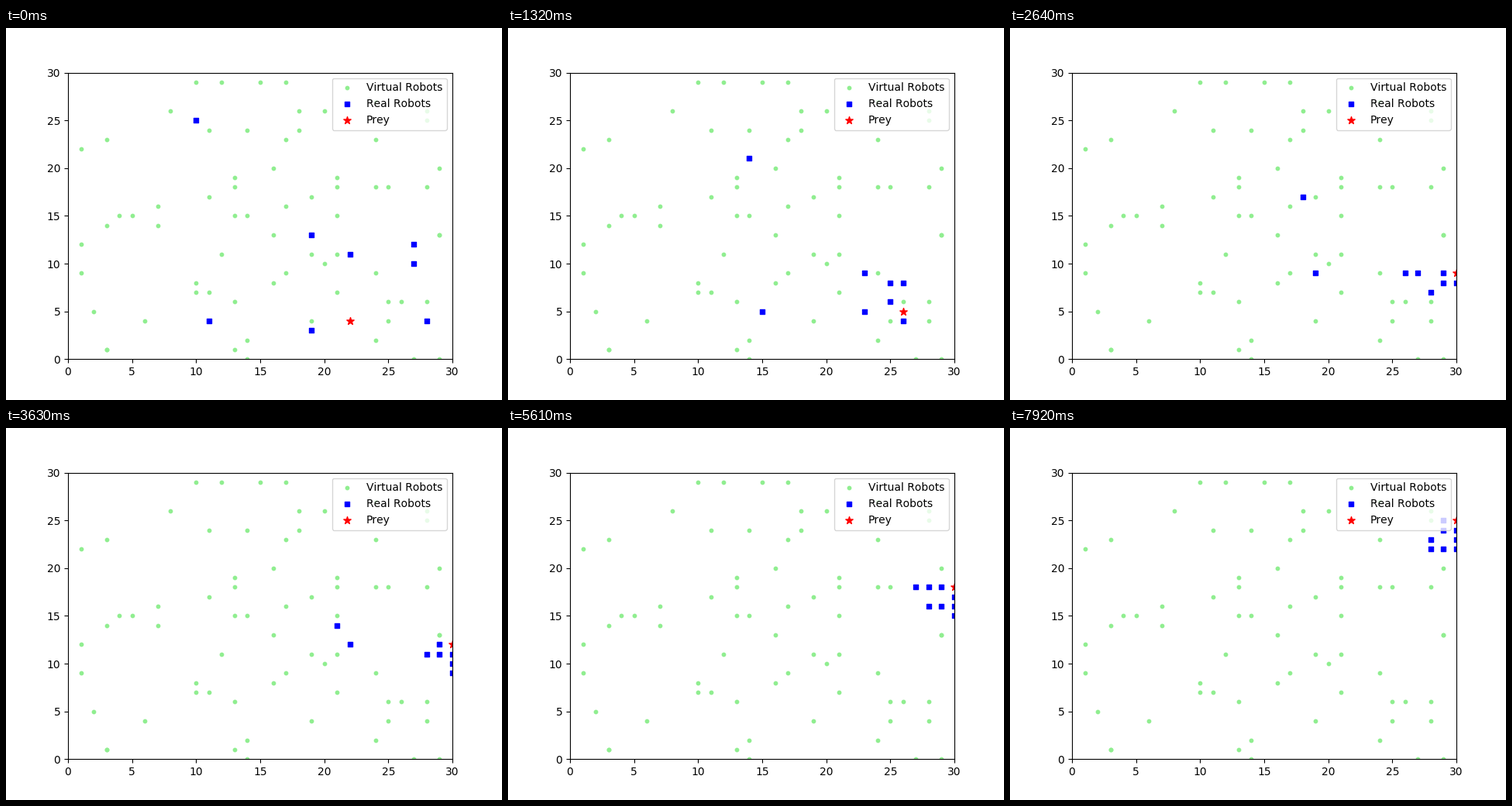
Recreate the animation shown at these times as a matplotlib script. Size 640 by 480 pixels, loop 8000 ms.

```python
import numpy as np
import matplotlib.pyplot as plt
from matplotlib.animation import FuncAnimation

SIZE = 30
LOOP_MS = 8000
STEP_MS = 330
TICK_MS = 20
STEPS = 24
DOTS = 70

# Each hunter: start cell, place it wants beside the prey,
# steps it trails behind, and the distance at which it holds still
HUNTERS = [
    dict(start=(22, 11), slot=(0, -1), lag=0, gap=0),
    dict(start=(27, 10), slot=(0, 0), lag=1, gap=0),
    dict(start=(28, 4), slot=(0, 0), lag=2, gap=2),
    dict(start=(27, 12), slot=(-1, 0), lag=0, gap=0),
    dict(start=(19, 3), slot=(-1, 0), lag=0, gap=3),
    dict(start=(11, 4), slot=(-1, 0), lag=0, gap=0),
    dict(start=(10, 25), slot=(-2, 0), lag=0, gap=4),
    dict(start=(19, 13), slot=(-2, 0), lag=0, gap=4),
]


def prey_at(step):
    """The prey runs right, then turns diagonally and climbs the right edge."""
    step = max(step, 0)
    return np.array([min(SIZE, 22 + step), max(4, step + 1)])


def advance(cells, step):
    """Move the hunters in turn by at most one cell; no two share a cell."""
    cells = list(cells)
    prey = prey_at(step)
    for i, hunter in enumerate(HUNTERS):
        x, y = cells[i]
        if np.abs(prey - (x, y)).sum() <= hunter["gap"]:
            continue
        goal = prey_at(step - hunter["lag"]) + hunter["slot"]
        dx, dy = (int(d) for d in np.sign(goal - (x, y)))
        others = cells[:i] + cells[i + 1:]
        options = [(x + dx, y + dy), (x + dx, y), (x, y)]
        cells[i] = next(c for c in options if c not in others)
    return cells


history = [[hunter["start"] for hunter in HUNTERS]]
for step in range(1, STEPS + 1):
    history.append(advance(history[-1], step))

dots = np.random.default_rng(7).integers(0, SIZE, (DOTS, 2))

plt.rcParams["text.kerning_factor"] = 6
fig, ax = plt.subplots(figsize=(6.4, 4.8), dpi=100)
ax.set_xlim(0, SIZE)
ax.set_ylim(0, SIZE)
ax.scatter(*dots.T, s=10, c="lightgreen", label="Virtual Robots")
robots = ax.scatter(*zip(*history[0]), s=20, c="blue", marker="s",
                    label="Real Robots")
prey = ax.scatter(*prey_at(0), s=50, c="red", marker="*", label="Prey")
ax.legend(loc="upper right")


def update(frame):
    step = min(STEPS, int((frame + 0.5) * TICK_MS // STEP_MS))
    robots.set_offsets(history[step])
    prey.set_offsets([prey_at(step)])
    return robots, prey


anim = FuncAnimation(fig, update, frames=LOOP_MS // TICK_MS, interval=TICK_MS,
                     repeat=True, repeat_delay=0, blit=False)
plt.show()
```
